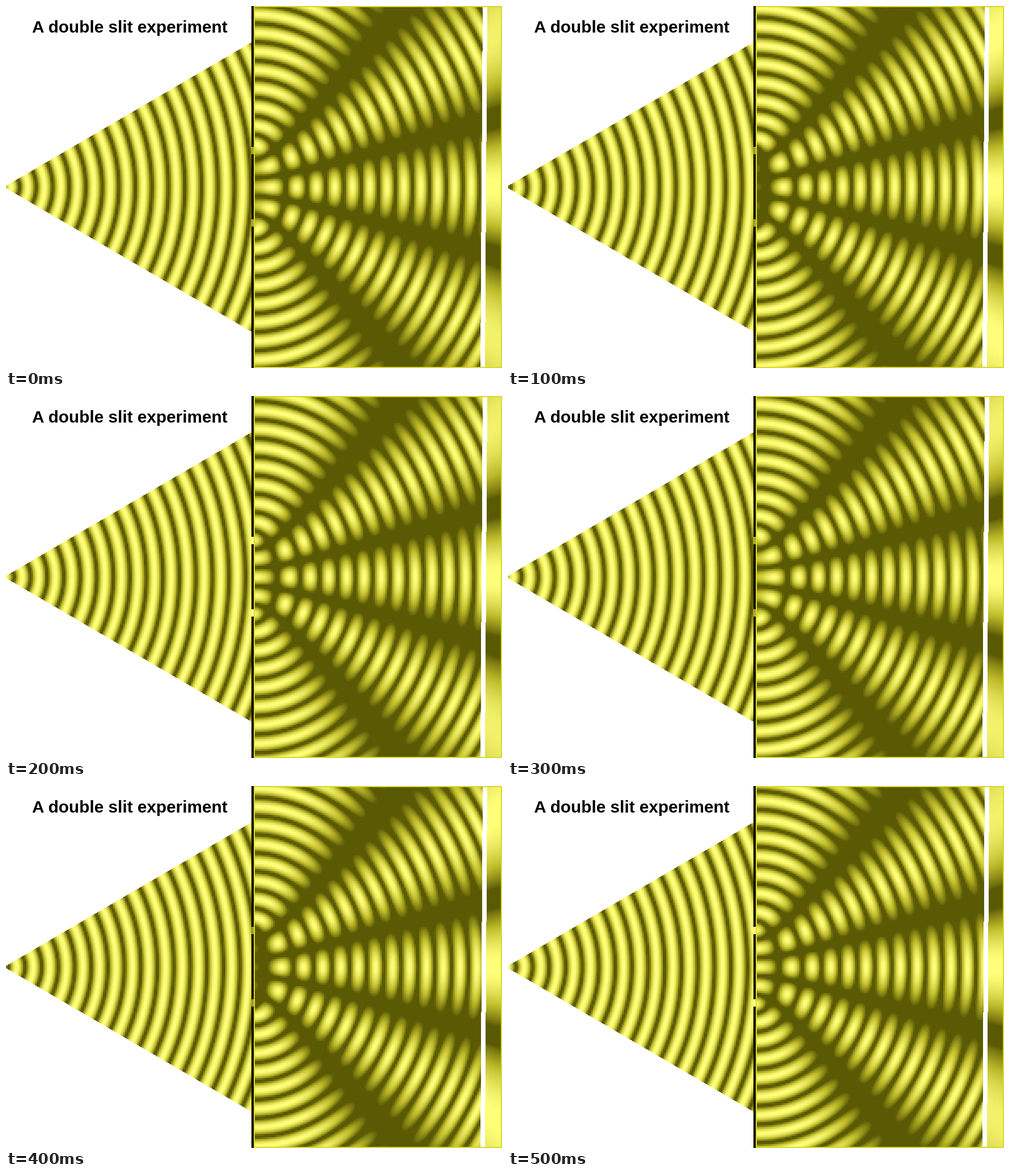
A matplotlib script for the animation above (0.6 s loop, 875x640 px).

```python
import numpy as np
import matplotlib.pyplot as plt
from matplotlib.animation import FuncAnimation

W, H, DPI = 875, 640, 100
BAND = 29.15            # distance between bright fronts
PHASE = 9.5             # first bright front at the start of the loop
CYCLE = 3               # steps until the pattern repeats
MID_Y = 320
SQUASH = 0.89           # the waves are stretched upright by its inverse
SLIT = 60               # slit offset from the axis, in wave units
CELL = 3

STOPS = [0, 0.5, 1]
RAMP = np.array([(91, 90, 4), (190, 187, 42), (255, 254, 122)])
BORDER = (220, 216, 44)

y, x = np.mgrid[0:H, 0:W] + 0.5
cell_x = (x // CELL + 0.5) * CELL
cell_y = (y // CELL + 0.5) * CELL


def distance(px, offset):
    return np.hypot(cell_x - px, SQUASH * (cell_y - MID_Y) - offset)


def colour(intensity):
    level = np.clip((intensity - 0.05) / 0.93, 0, 1) ** 0.65
    return np.stack([np.interp(level, STOPS, c) for c in RAMP.T], axis=-1)


def angle(r, step):
    return np.pi * ((r - PHASE) / BAND - step / CYCLE)


# Distances to the lamp and to the two slits
lamp = distance(0, 0)
upper = distance(437, -SLIT)
lower = distance(437, SLIT)
steady = np.cos(np.pi * (upper - lower) / (2 * BAND)) ** 2
outer = np.abs(upper - lower) > BAND

# Regions of the stage
tilt = 4 * y / H
fan = (x < 433) & (np.abs(y - MID_Y) < 2 + 0.586 * x)
barrier = (x > 433) & (x < 437)
slits = barrier & (np.abs(np.abs(y - 319.5) - 64) < 6.5)
field = (x > 437) & (x < 841 - tilt)
screen = x > 849 - tilt
edge = (x > 437) & ((x < 439) | (x > W - 2) | (y < 2) | (y > H - 2))


def render(step):
    image = np.full((H, W, 3), 255.0)
    image[fan] = colour(np.cos(angle(lamp[fan], step)) ** 2)
    both = np.cos(angle(upper, step)) + np.cos(angle(lower, step))
    image[field] = colour((both[field] / 2) ** 2)
    dim = 0.1 * (1 - np.cos(2 * np.pi * (step - 1) / CYCLE))
    image[screen] = colour((steady * (1 - dim * outer))[screen])
    image[barrier] = 0
    image[slits] = colour(np.cos(angle(0, step)) ** 2)
    image[edge] = BORDER
    return image.round().astype(np.uint8)


fig = plt.figure(figsize=(W / DPI, H / DPI), dpi=DPI)
ax = fig.add_axes([0, 0, 1, 1])
ax.axis("off")
picture = ax.imshow(render(0), extent=(0, W, H, 0), aspect="auto",
                    interpolation="nearest")
ax.text(46.5, 47, "A double slit experiment", family="Liberation Sans",
        weight="bold", size=29.7 * 72 / DPI, color="black", va="baseline")


def update(step):
    picture.set_data(render(step))
    return [picture]


anim = FuncAnimation(fig, update, frames=6, interval=100, repeat=True,
                     repeat_delay=0)
plt.show()
```
